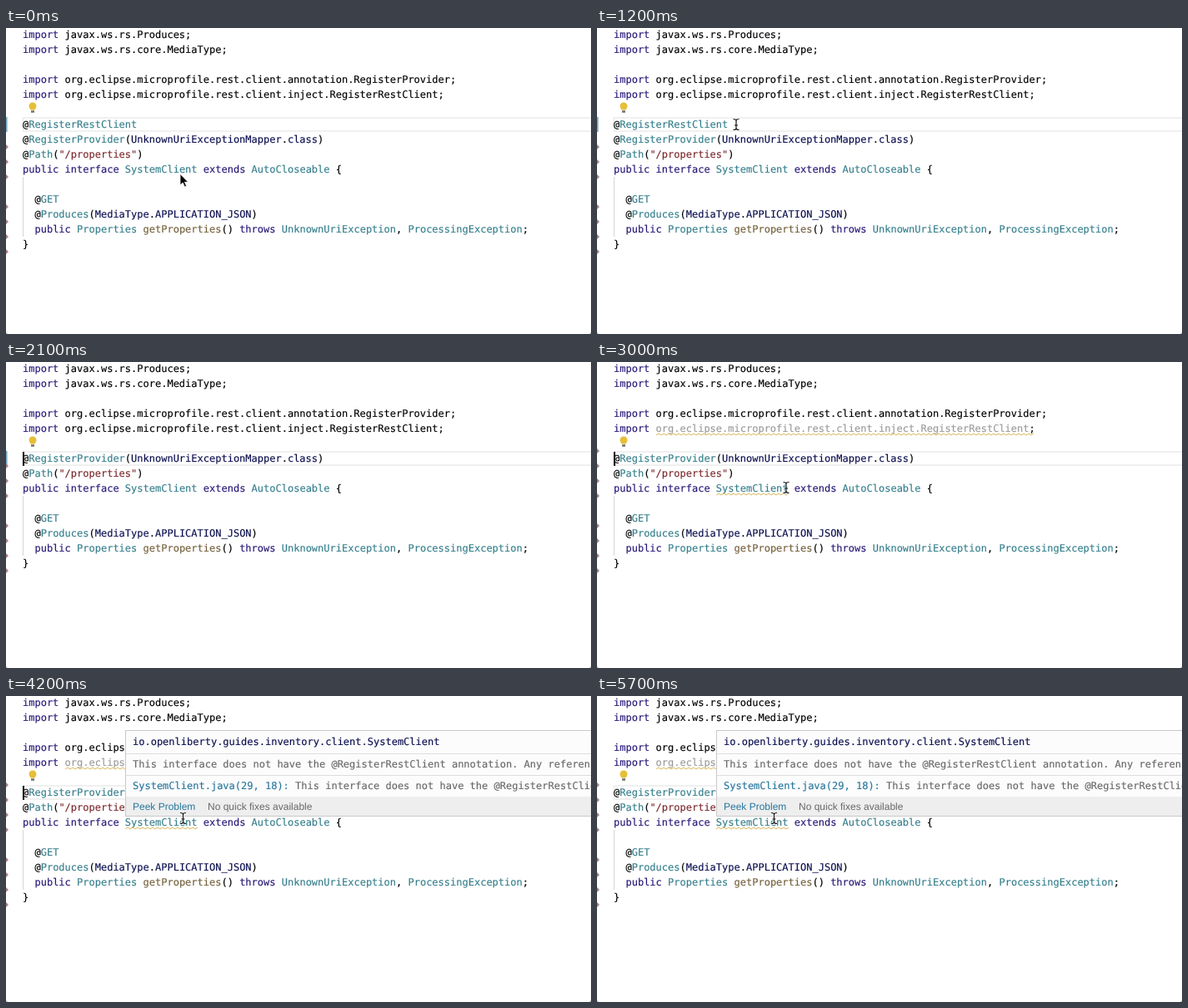
Animation, 702 px wide and 368 px high, one loop 5800 ms. Source, as an HTML page:

```html
<!DOCTYPE html>
<html lang="en">
<head>
<meta charset="utf-8">
<style>
  html, body { margin: 0; width: 100%; height: 100%; overflow: hidden; background: #999; }
  svg { display: block; width: 702px; height: 368px; }
  text {
    font: 12px "DejaVu Sans Mono", monospace; white-space: pre; text-rendering: geometricPrecision;
    color: #000; fill: currentColor; stroke: currentColor; stroke-width: .15;
  }
  tspan { fill: currentColor; stroke: currentColor; }
  .sans { font: 12px "Liberation Sans", sans-serif; stroke: none; }
  .k { color: #281a78; }
  .t { color: #357f8c; }
  .v { color: #0d1050; }
  .s { color: #7c2a2e; }
  .f { color: #74603c; }
  .unused { color: #9b9b9b; }
  .link { color: #27769c; }
  .note { color: #686868; }
  .squiggle { fill: none; stroke: #d9b658; stroke-width: 1; }
</style>
</head>
<body>
<svg viewBox="0 0 702 368">
  <path d="M0 0H702V365Q702 368 699 368H3Q0 368 0 365Z" fill="#fff"/>
  <rect id="currentLine" x="20.5" y="108" width="690" height="16" fill="none" stroke="#e9e9e9" stroke-width="1.3"/>
  <rect id="selection" x="20" y="107" width="144" height="18" rx="2" fill="#add6ff"/>
  <rect id="changeBar" x="0" y="107" width="1.6" height="18" fill="#76a9c2"/>
  <g id="header"></g>
  <g id="removed"></g>
  <g id="body">
    <path d="M20.5 179V251" stroke="#d6d6d6"/>
    <g id="markers" fill="#a5808a"></g>
  </g>
  <path id="savedMarker" d="M0 104l3 3-3 3z" fill="#a5808a"/>
  <g id="warnings"></g>
  <g id="bulb">
    <path d="M32 89.5c-2.700 0-4.500 2-4.500 4.400 0 2 1.500 2.800 2 4.600h5c.5-1.800 2-2.600 2-4.600 0-2.400-1.800-4.400-4.500-4.400z" fill="#e6bf38"/>
    <path d="M30 99.200h4v2.600h-4z" fill="#77766f"/>
  </g>
  <rect id="caret" y="108" width="2" height="17" fill="#000"/>
  <g id="hover">
    <rect x="143.500" y="41.500" width="570" height="103" fill="#fcfcfc" stroke="#c9c9c9"/>
    <rect x="144" y="121" width="570" height="23" fill="#eeeeee"/>
    <path d="M144 69.500H702M144 95.500H702" stroke="#dedede"/>
    <text x="152" y="59" class="v">io.openliberty.guides.inventory.client.SystemClient</text>
    <text x="152" y="86" class="note">This interface does not have the @RegisterRestClient annotation. Any references</text>
    <text x="152" y="112" class="note"><tspan class="link">SystemClient.java(29, 18):</tspan> This interface does not have the @RegisterRestClient annotation.</text>
    <text x="152" y="137" class="sans link">Peek Problem</text>
    <text x="242" y="137" class="sans note">No quick fixes available</text>
  </g>
  <path id="arrow" d="M0 0V13.500L3.200 10.600 5.400 15.600 7.600 14.600 5.400 9.800H9.600Z" fill="#000" stroke="#fff" stroke-width=".8"/>
  <g id="beam" fill="none">
    <path d="M-3.500-6.500Q0-6.500 0-4.500Q0-6.500 3.500-6.500M0-4.500V4.500M-3.500 6.500Q0 6.500 0 4.500Q0 6.500 3.500 6.500M-2 1H2" stroke="#fff" stroke-width="2.600"/>
    <path d="M-3.500-6.500Q0-6.500 0-4.500Q0-6.500 3.500-6.500M0-4.500V4.500M-3.500 6.500Q0 6.500 0 4.500Q0 6.500 3.500 6.500M-2 1H2" stroke="#111" stroke-width="1.200"/>
  </g>
</svg>
<script>
const LOOP = 5800, LINE = 18, LEFT = 20;
const SELECT = 1400, REMOVE = 2000, SAVE = 2300, WARN = 2700, HOVER = 3400;
const el = id => document.getElementById(id);

// <class text> marks a coloured token.
const code = [
  '<k import> javax.ws.rs.Produces;',
  '<k import> javax.ws.rs.core.MediaType;',
  '',
  '<k import> org.eclipse.microprofile.rest.client.annotation.RegisterProvider;',
  '<k import> <import org.eclipse.microprofile.rest.client.inject.RegisterRestClient>;',
  '',
  '@<t RegisterRestClient>',
  '@<t RegisterProvider>(<v UnknownUriExceptionMapper>.<v class>)',
  '@<t Path>(<s "/properties">)',
  '<k public> <k interface> <t SystemClient> <k extends> <t AutoCloseable> {',
  '',
  '  @<t GET>',
  '  @<t Produces>(<v MediaType>.<v APPLICATION_JSON>)',
  '  <k public> <t Properties> <f getProperties>() <k throws> <t UnknownUriException>, <t ProcessingException>;',
  '}'
];

code.forEach((line, i) => {
  const group = el(i < 6 ? 'header' : i === 6 ? 'removed' : 'body');
  const spans = line.replace(/<(\w+) ([^>]*)>/g, '<tspan class="$1">$2</tspan>');
  group.insertAdjacentHTML('beforeend', `<text x="${LEFT}" y="${12 + i * LINE}">${spans}</text>`);
});
const unusedImport = document.querySelector('.import');

for (const y of [143, 161, 179, 215, 233, 251, 269])
  el('markers').insertAdjacentHTML('beforeend', `<path d="M0 ${y - 3}l3 3-3 3z"/>`);

function addSquiggle(x, y, width) {
  let d = `M${x} ${y + 1}`;
  for (let i = 1; i * 3 <= width; i++) d += `L${x + i * 3} ${y + (i % 2 ? -1 : 1)}`;
  el('warnings').insertAdjacentHTML('beforeend', `<path class="squiggle" d="${d}"/>`);
}
addSquiggle(71, 87, 453);
addSquiggle(143, 159, 87);

const show = (id, on) => el(id).setAttribute('visibility', on ? 'visible' : 'hidden');
const move = (id, x, y) => el(id).setAttribute('transform', `translate(${x} ${y})`);

function glide(t, start, end, from, to) {
  const p = Math.min(1, Math.max(0, (t - start) / (end - start)));
  const e = p * p * (3 - 2 * p);
  return from.map((v, i) => v + (to[i] - v) * e);
}

function caretOn(t) {
  if (t < 700) return false;
  const since = t < SELECT ? 700 : t < REMOVE ? SELECT : REMOVE;
  return (t - since) % 1000 < 500 || (t >= SELECT && t < REMOVE);
}

function render(t) {
  const selected = t >= SELECT && t < REMOVE;
  const removed = t >= REMOVE;

  show('selection', selected);
  show('currentLine', !selected);
  show('removed', !removed);
  move('body', 0, removed ? -LINE : 0);
  move('bulb', 0, selected ? LINE : 0);
  show('changeBar', t < SAVE);
  show('savedMarker', t >= SAVE);
  show('warnings', t >= WARN);
  unusedImport.classList.toggle('unused', t >= WARN);
  show('hover', t >= HOVER);

  show('caret', caretOn(t));
  el('caret').setAttribute('x', t < SELECT ? 156.5 : 20);

  const isArrow = t < 200;
  show('arrow', isArrow);
  show('beam', !isArrow && (t < SELECT || t >= 2600));
  move('arrow', 209, 175.5);
  const pointer = t < SELECT ? glide(t, 200, 700, [209, 176], [167, 116])
    : t < 3000 ? glide(t, 2600, 2950, [167, 116], [227, 151])
    : glide(t, 3000, 3300, [227, 151], [212.5, 147]);
  move('beam', ...pointer);
}

const start = performance.now();
function frame() {
  render((performance.now() - start) % LOOP);
  requestAnimationFrame(frame);
}
frame();
</script>
</body>
</html>
```
